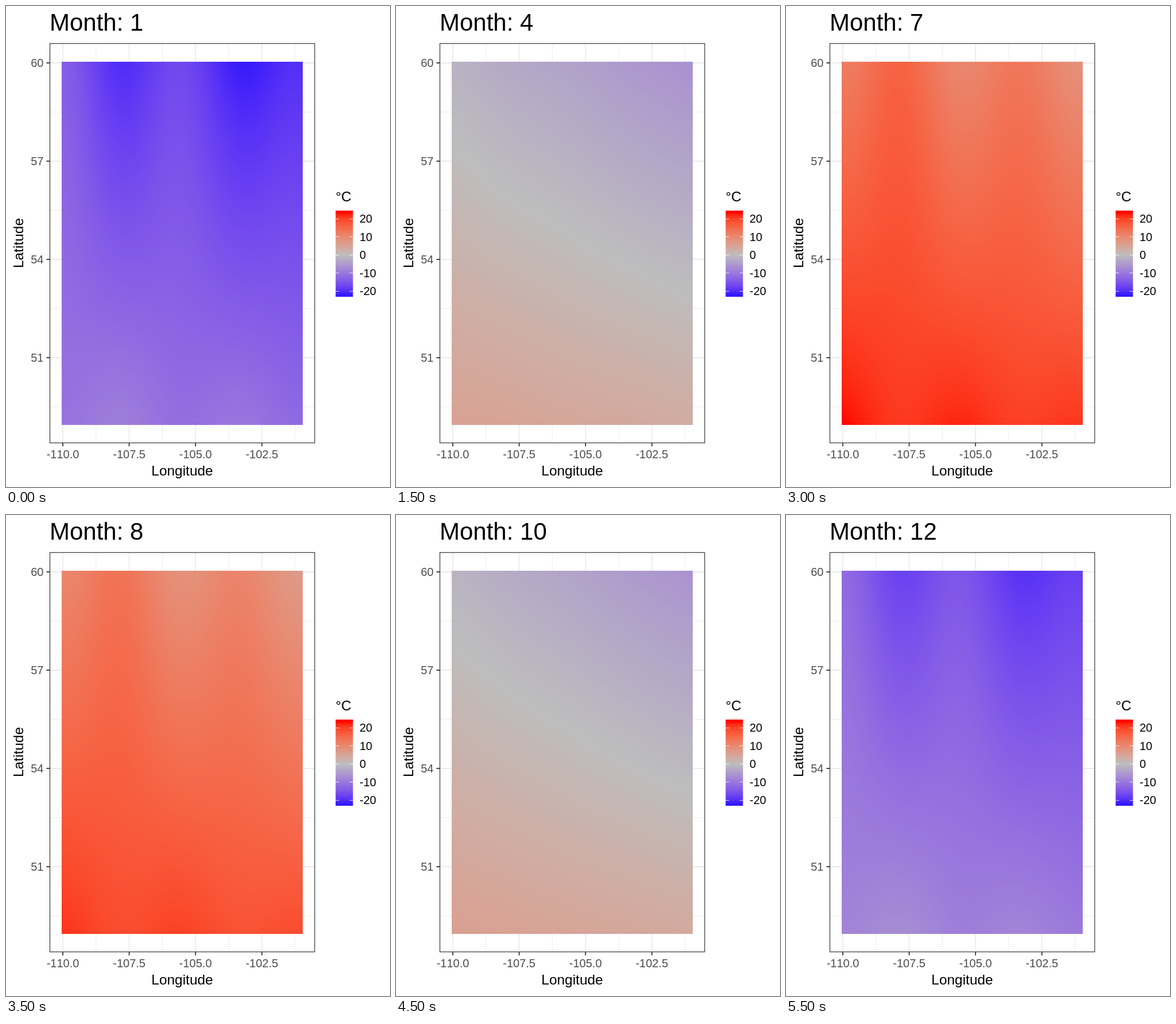
Recreate the animation shown at these times as an HTML page with a canvas. Size 669 by 837 pixels, loop 6000 ms.

```html
<!DOCTYPE html>
<html lang="en">
<head>
<meta charset="utf-8">
<title>Monthly temperature</title>
<style>
  html, body { margin: 0; width: 100%; height: 100%; overflow: hidden; background: #fff; }
  svg, canvas { position: absolute; left: 0; top: 0; }
  text { font-family: "Liberation Sans", Arial, sans-serif; font-kerning: none; }
</style>
</head>
<body>
<svg id="plot" width="669" height="837"></svg>
<canvas id="map" width="669" height="837"></canvas>
<script>
const svg = document.getElementById('plot');
const ctx = document.getElementById('map').getContext('2d');
const MAP = { x: 97, y: 97, w: 420, h: 632 };
const PANEL = { l: 76.5, t: 65.3, r: 537.8, b: 760.2 };
const MIN = -22, MAX = 23.25, DEG = 3.15, ZERO_Y = 433;

// Strength of summer (1) or winter (-1), January to December
const season = [-1, -1, -0.62, -0.05, 0.47, 0.8, 1, 0.87, 0.4, -0.03, -0.5, -0.86];

// u runs west to east, v north to south, both 0 to 1
function temperature(u, v, heat) {
  const mean = -0.95 + 7.2 * v - (4.8 - 2.9 * v) * u;
  const wave = (2.7 - 1.33 * u) * (1 - 1.4 * v) * Math.cos(4 * Math.PI * u);
  return mean + heat * (15.6 + 0.3 * v - wave);
}

// Diverging blue - grey - red scale, mixed in Lab
const GREY = [76.6, 0, 0], BLUE = [32.3, 79.19, -107.86], RED = [53.24, 80.09, 67.2];

function labToRgb([L, a, b]) {
  const cube = f => f > 6 / 29 ? f ** 3 : (f - 4 / 29) * 108 / 841;
  const f = (L + 16) / 116;
  const X = 0.9505 * cube(f + a / 500), Y = cube(f), Z = 1.089 * cube(f - b / 200);
  return [
    3.2406 * X - 1.5372 * Y - 0.4986 * Z,
    -0.9689 * X + 1.8758 * Y + 0.0415 * Z,
    0.0557 * X - 0.204 * Y + 1.057 * Z
  ].map(v => {
    v = Math.min(1, Math.max(0, v));
    return Math.round(255 * (v > 0.0031308 ? 1.055 * v ** (1 / 2.4) - 0.055 : 12.92 * v));
  });
}

const STEPS = 400;
const palette = Array.from({ length: 2 * STEPS + 1 }, (_, i) => {
  const t = i / STEPS - 1, end = t < 0 ? BLUE : RED;
  return labToRgb(GREY.map((g, k) => g + (end[k] - g) * Math.abs(t)));
});
function colour(temp) {
  const t = Math.max(MIN, Math.min(MAX, temp)) / MAX;
  return palette[Math.round((t + 1) * STEPS)];
}

function drawMap(heat) {
  const { x, y, w, h } = MAP;
  const img = ctx.createImageData(w, h);
  for (let j = 0; j < h; j++) {
    for (let i = 0; i < w; i++) {
      const [red, green, blue] = colour(temperature((i + 0.5) / w, (j + 0.5) / h, heat));
      img.data.set([red, green, blue, 255], 4 * (j * w + i));
    }
  }
  ctx.putImageData(img, x, y);
}

function drawLegend() {
  for (let y = 356; y < 506; y++) {
    ctx.fillStyle = `rgb(${colour((ZERO_Y - y - 0.5) / DEG)})`;
    ctx.fillRect(574.3, y, 30.2, 1);
  }
  ctx.fillStyle = 'rgba(255,255,255,.75)';
  for (let v = -20; v <= 20; v += 10) {
    const y = Math.round(ZERO_Y - v * DEG - 0.5);
    ctx.fillRect(574.3, y, 6, 1);
    ctx.fillRect(598.5, y, 6, 1);
  }
}

function add(tag, attrs, content = '') {
  const el = document.createElementNS('http://www.w3.org/2000/svg', tag);
  for (const k in attrs) el.setAttribute(k, attrs[k]);
  el.textContent = content;
  return svg.appendChild(el);
}
const line = (x1, y1, x2, y2, stroke, width) =>
  add('line', { x1, y1, x2, y2, stroke, 'stroke-width': width });
const label = (x, y, content, size, anchor = 'start', fill = '#000') =>
  add('text', { x, y, 'font-size': size, 'text-anchor': anchor, fill }, content);

const { l, t, r, b } = PANEL, GRID = '#ebebeb', DARK = '#333', SMALL = 20, BASE = 24.44;
for (let i = 0; i < 4; i++) {
  const x = 99 + i * 115.6, y = 99 + i * 171;
  line(x + 57.8, t, x + 57.8, b, GRID, 0.9);
  line(l, y + 85.5, r, y + 85.5, GRID, 0.9);
  line(x, t, x, b, GRID, 1.8);
  line(l, y, r, y, GRID, 1.8);
  line(x, b, x, b + 6.1, DARK, 1.8);
  line(l - 6.1, y, l, y, DARK, 1.8);
  label(x, 786.7, (-110 + 2.5 * i).toFixed(1), SMALL, 'middle', '#4d4d4d');
  label(65.5, y + 7, 60 - 3 * i, SMALL, 'end', '#4d4d4d');
}
add('rect', { x: l, y: t, width: r - l, height: b - t, fill: 'none', stroke: DARK, 'stroke-width': 1.2 });
label(307, 817, 'Longitude', BASE, 'middle');
label(0, 0, 'Latitude', BASE, 'middle').setAttribute('transform', 'translate(30 412.5) rotate(-90)');
label(574.3, 340, '°C', BASE);
for (let v = -20; v <= 20; v += 10) label(616, ZERO_Y - v * DEG + 7, v, SMALL);
const title = label(76, 43, '', 42);
drawLegend();

let shown = -1;
const start = performance.now();
function tick() {
  const month = Math.floor((performance.now() - start) % 6000 / 500);
  if (month !== shown) {
    shown = month;
    title.textContent = `Month: ${month + 1}`;
    drawMap(season[month]);
  }
  requestAnimationFrame(tick);
}
tick();
</script>
</body>
</html>
```
